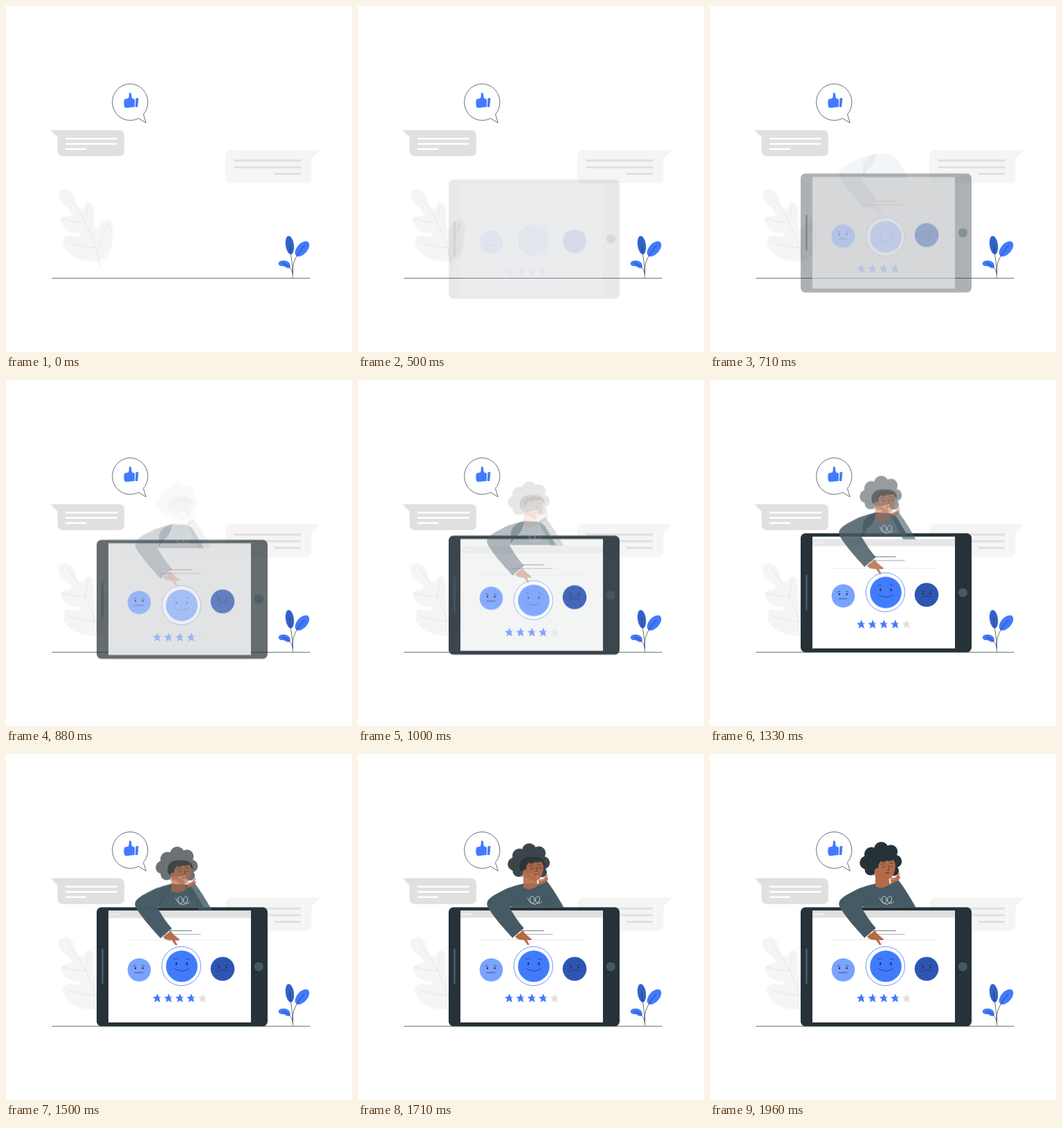
These frames come from a looping animation (500 px wide and 500 px high, 2000 ms). An HTML page:

```html
<!DOCTYPE html>
<html lang="en">
<head>
<meta charset="utf-8">
<title>Customer feedback</title>
<style>
  html, body { margin: 0; width: 100%; height: 100%; overflow: hidden; background: #fff; }
  svg { display: block; width: 100vw; height: 100vh; }

  .blue { fill: #407bff; }
  .dark { fill: #263238; }
  .slate { fill: #455a64; }
  .skin { fill: #b56b47; }
  .grey { fill: #e0e0e0; }
  .pale { fill: #f5f5f5; }
  .white { fill: #fff; }
  .ink { fill: none; stroke: #263238; stroke-width: .7; stroke-linecap: round; stroke-linejoin: round; }
  .vein { fill: none; stroke: #e0e0e0; stroke-width: .7; }

  /* Every part of a group fades on its own, so overlaps show through. */
  .tablet > *, .page > *, .torso > *, .forearm > *, .head > * {
    animation: 2s cubic-bezier(.3, 0, .7, 1) infinite;
  }
  .tablet > *, .page > * { --d: 33px; animation-timing-function: cubic-bezier(.6, 0, .6, 1); }
  .torso > * { --d: 28px; }
  .bar > * { --d: 23px; }
  .forearm > *, .head > * { --d: 22px; }
  .tablet > * { animation-name: tablet; }
  .page > * { animation-name: page; }
  .torso > * { animation-name: torso; }
  .forearm > * { animation-name: forearm; }
  .head > * { animation-name: head; }

  @keyframes tablet {
    0%, 10% { opacity: 0; transform: translateY(var(--d)); }
    60%, 100% { opacity: 1; transform: translateY(0); }
  }
  @keyframes page {
    0%, 14.5% { opacity: 0; transform: translateY(var(--d)); }
    69.5%, 100% { opacity: 1; transform: translateY(0); }
  }
  @keyframes torso {
    0%, 28.5% { opacity: 0; transform: translateY(var(--d)); }
    78.5%, 100% { opacity: 1; transform: translateY(0); }
  }
  @keyframes forearm {
    0%, 36% { opacity: 0; transform: translateY(var(--d)); }
    88.5%, 100% { opacity: 1; transform: translateY(0); }
  }
  @keyframes head {
    0%, 38.5% { opacity: 0; transform: translateY(var(--d)); }
    96%, 100% { opacity: 1; transform: translateY(0); }
  }
</style>
</head>
<body>
<svg viewBox="0 0 500 500">
  <defs>
    <path id="star" d="M0-6.7 1.9-2.3 6.6-1.9 3-1.2 3 1.2 4.2 5.8 0 3.3-4.2 5.8-3 1.2-6.6-1.9-1.9-2.3Z"/>
  </defs>

  <!-- ground -->
  <path class="ink" d="M67 393.4H439" stroke-width=".6"/>

  <!-- large leaf -->
  <path class="pale" d="M75.5 273C76 267 82 264 88 265.500C96 268 99 273 100 281C101 288 106 294 110 293C114 291 112 284 119 283.500C126 284 127 290 127 299C127 310 125 321 130 322C136 322 136 309 147 309C156 311 155 322 154 333C153 349 150 360 141 366C131 371 115 370 103 365C92 360 84 351 82 342C82 334 88 331 95 332C102 334 106 335 107 331C106 327 100 328 94 327C85 325 80 316 79.500 308C81 303 88 304 93 303C97 301 94 296 88 291C81 286 76 281 75.500 273Z"/>
  <path class="vein" d="M89 272C98 287 109 300 115 313C123 332 133 352 137 381M115 313C104 313 92 311 80 307M115 313Q117 300 119 288M129 349Q108 349 87 340M131 353Q138 334 149 314"/>

  <!-- small plant -->
  <ellipse cx="410" cy="345.500" rx="6" ry="13.300" fill="#3362cc" transform="rotate(-8 410 345.500)"/>
  <ellipse class="blue" cx="428" cy="351" rx="7.500" ry="13" transform="rotate(42 428 351)"/>
  <path class="blue" d="M394 371C396 367 404 367 408 370C411 372 412 377 409.500 378.500C406 380 404 376 400 376C396 376 393 374 394 371Z"/>
  <path class="ink" stroke-width=".6" d="M414.500 392C415 372 411 362 410 344M414.300 387C413 372 419 360 431 347M414.300 387C413 379 408 374 400 372"/>

  <!-- like bubble -->
  <path class="ink white" style="fill:#fff" d="M191 162.500A25.600 26.400 0 1 1 198.500 156.500L202.300 168.500Z"/>
  <path class="blue" d="M171 135.500C172 133.500 175 134.500 176.500 133.500C179 131 177 127 178.300 125.500C181 124.500 181.500 128 181.300 130.500C181.500 133 183 134.500 186 134.700L185.800 146C181 146 177 147.500 172 147C170 144 170 139 171 135.500ZM187.500 133.300L191.500 133 190.300 146H186.800Z"/>

  <!-- chat bubbles -->
  <path class="grey" d="M64.500 179.500H163Q171 179.500 171 187.500V209Q171 217 163 217H82.500Q74.500 217 74.500 209V189.500Z"/>
  <path d="M87 191.700H160M87 199.200H160M87 206.800H115" stroke="#fff" stroke-width="2.400" stroke-linecap="round"/>
  <path class="pale" d="M454 208H327Q317 208 317 218V246Q317 256 327 256H431.500Q441.500 256 441.500 246V220.500Z"/>
  <path d="M330 223.300H426M330 233H426M388 242.500H426" stroke="#e0e0e0" stroke-width="2.900"/>

  <g class="tablet">
    <rect class="dark" x="131" y="221.500" width="247" height="172" rx="7"/>
    <rect class="white" x="148" y="226.500" width="206" height="161.300"/>
    <rect class="white" x="148" y="226.500" width="206" height="161.300" fill-opacity=".5"/>
    <circle class="slate" cx="365.400" cy="307.200" r="6.500"/>
    <rect class="slate" x="138" y="281" width="2.800" height="52" rx="1.400"/>
    <g>
      <circle cx="192.500" cy="312" r="16.800" fill="#79a3ff"/>
      <ellipse class="dark" cx="187" cy="309.500" rx="1.100" ry="1.600"/>
      <ellipse class="dark" cx="197.700" cy="309.500" rx="1.100" ry="1.600"/>
      <path class="ink" d="M186 316H198M184.500 306.500L188 305.500M196.500 305.500L200 306.500"/>
    </g>
    <g>
      <circle cx="313" cy="310.500" r="17.300" fill="#2d56b3"/>
      <ellipse class="dark" cx="307.500" cy="308.500" rx="1.100" ry="1.600"/>
      <ellipse class="dark" cx="318.500" cy="308.500" rx="1.100" ry="1.600"/>
      <path class="ink" d="M306 314.500Q313 309.500 320 314.500M305 304.500L309 306M317 306L321 304.500"/>
    </g>
  </g>

  <g class="torso bar">
    <g>
      <rect class="grey" x="148" y="226.500" width="206" height="10"/>
      <circle class="white" cx="153.300" cy="231.500" r="1.300"/>
      <circle class="white" cx="157.800" cy="231.500" r="1.300"/>
      <circle class="white" cx="162.300" cy="231.500" r="1.300"/>
    </g>
    <path class="vein" d="M176 268.500H328"/>
  </g>

  <g class="page">
    <path class="ink" d="M236.500 255.300H268"/>
    <path class="ink" d="M222 260.700H281" stroke-opacity=".6"/>
    <circle cx="253.400" cy="306.500" r="28.200" fill="#fff" stroke="#407bff" stroke-width=".8"/>
    <g>
      <circle class="blue" cx="254" cy="306.700" r="22.800"/>
      <ellipse class="dark" cx="246.200" cy="303" rx="1.300" ry="2"/>
      <ellipse class="dark" cx="261.500" cy="303" rx="1.300" ry="2"/>
      <path class="ink" d="M244 310.500Q254 317 264 310.500M242.500 297Q244.500 295.200 247 296M260.500 296Q263 295.200 265 297"/>
    </g>
    <g class="blue">
      <use href="#star" x="218.700" y="353"/>
      <use href="#star" x="235.100" y="353"/>
      <use href="#star" x="251.400" y="353"/>
      <use href="#star" x="267.700" y="353"/>
    </g>
    <use class="grey" href="#star" x="284.200" y="353"/>
  </g>

  <g class="torso">
    <path class="slate" d="M240 187C230 190 223 194 221 204V221.800H286L270 194Q266 190 260 188Z"/>
    <path class="skin" d="M227 264L238 255C242 261 247 264 251 267.500Q251 270 244 268.500L247.300 275Q246.300 277.300 244.500 275.300L239.500 268.500Q231 269.500 227 264Z"/>
    <path class="slate" d="M240 187C228 190 216 193 206 199C198 203 191 207 187.500 212Q185 217 188 222C197 237 210 251 223 265.500L239.500 251.500C231 242 225 232 219 222L226 211Q238 204 240 187Z"/>
    <path d="M219 222L226 210M223 265.500L239.500 251.500" fill="none" stroke="#37474f" stroke-width=".6"/>
    <path d="M245.500 207.500C247 216 256 219 255 210C254 203 247 205 249 212C251 219 261 219 262.500 210C263 203 256 205 256.500 211C257 217 263 216 265.500 213.500" fill="none" stroke="#f0f0f0" stroke-width=".8"/>
  </g>

  <g class="forearm">
    <path class="slate" d="M260.500 187L271 180.500C281 193 289 207 297.500 221.800H279Z"/>
  </g>

  <g class="head">
    <g class="dark">
      <circle cx="233.500" cy="145" r="10.500"/>
      <circle cx="247.500" cy="137.500" r="10.500"/>
      <circle cx="261.500" cy="141" r="9.700"/>
      <circle cx="268" cy="155" r="9.200"/>
      <circle cx="226" cy="157" r="9.700"/>
      <circle cx="232" cy="167" r="8.500"/>
      <circle cx="266" cy="169" r="7"/>
      <ellipse cx="247" cy="156" rx="19" ry="15"/>
    </g>
    <path class="skin" d="M239 168V191Q249 197 260 188L257 175Z"/>
    <path class="skin" d="M241 155C242 149 264 147 267 153C269 163 267 174 262 179C257 183 250 181 246 176Q240 177 238 171Q237 165 242 165Z"/>
    <path class="dark" d="M234 165C231 152 240 145 252 147C264 146 271 151 270 160Q266 157 265 153Q260 156 255 154Q252 158 247 155Q243 158 243 165Q239 163 237 168Z"/>
    <path class="ink" d="M247.500 159.500Q250 157.700 252.500 159M259.500 158.300Q262 156.800 264.500 158M249 163.300Q251 164.500 253.500 163M260 162.500Q262 163.500 264.500 162M257.500 161L259 167.500 256.500 168"/>
    <path d="M253 171.800Q257 170.300 260 171.200Q257 175 253 171.800Z" fill="#8b3d2c"/>
    <circle class="blue" cx="237.500" cy="174.500" r="1.200"/>
    <path class="skin" d="M260.500 181C263 178 267 180 269 177Q272 173 274.500 172Q275 174 272.500 176.500L275 177Q274 182 270 184L262 187.500Z"/>
    <path d="M262 181.500Q266 181.500 270 179" fill="none" stroke="#fff" stroke-opacity=".45" stroke-width=".8"/>
  </g>
</svg>
</body>
</html>
```
